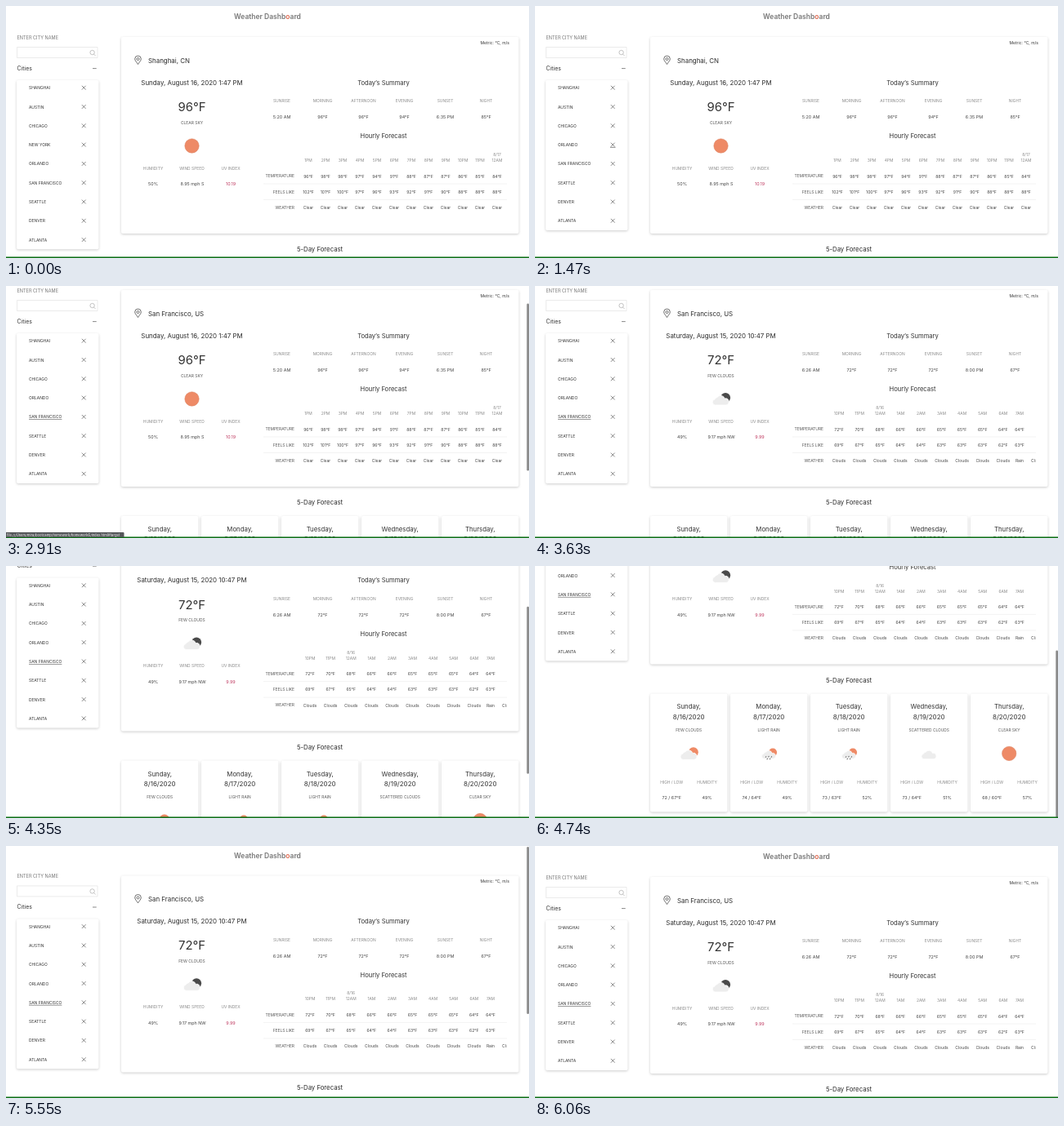
An HTML page for the animation above (6120 ms loop, 640 px wide and 309 px high).

```html
<!DOCTYPE html>
<html lang="en">
<head>
<meta charset="utf-8">
<title>Weather Dashboard</title>
<style>
  html, body { margin: 0; height: 100%; overflow: hidden; background: #fff; }
  svg { display: block; width: 100vw; height: 100vh; font-family: Inter, Roboto, sans-serif; fill: #444; }
  .panel { fill: #fff; filter: drop-shadow(0 1.3px 1.4px rgba(0, 0, 0, .2)); }
  .line { fill: none; stroke: #555; stroke-width: .7; }
</style>
</head>
<body>
<svg id="stage" viewBox="0 0 640 309"></svg>
<script>
const LOOP = 6120;
const GREY = '#8a8a8a', INK = '#2b2b2b', CORAL = '#ee8a66', PINK = '#bf3a60';
const ROW = 23.3;

// Text centred vertically on y; anchor is start, middle or end.
const text = (x, y, size, str, fill = '#444', anchor = 'middle', extra = '') =>
  `<text x="${x}" y="${y + size * .36}" font-size="${size}" fill="${fill}" text-anchor="${anchor}" ${extra}>${str}</text>`;
const label = (x, y, str, anchor) => text(x, y, 4.9, str, GREY, anchor);
const value = (x, y, str, fill) => text(x, y, 5.4, str, fill);
const path = (d, extra = '') => `<path class="line" d="${d}" ${extra}/>`;
const panel = (x, y, w, h) => `<rect class="panel" x="${x}" y="${y}" width="${w}" height="${h}" rx="2"/>`;
const group = (id, body) => `<g id="${id}">${body}</g>`;
const each = (list, fn) => list.map(fn).join('');

const sun = `<circle r="8.7" fill="${CORAL}" stroke="#d98263" stroke-width=".5"/>`;
const cloud = '<path d="M-7 7.5a3.6 3.6 0 0 1-.5-7.1 3.4 3.4 0 0 1 3-2.4 5.2 5.2 0 0 1 9.2 1.5 4 4 0 0 1 1.8 8z" ' +
  'fill="#ededed" stroke="#fff" stroke-width=".8"/>';
const behind = color => `<circle cx="5.6" cy="-1.6" r="6" fill="${color}"/>${cloud}`;
const drops = path('M-4 4l-.6 1.6M0 3.5l-.6 1.6M4 4l-.6 1.6M-2 7l-.6 1.6M2 7l-.6 1.6',
  'style="stroke:#444;stroke-width:1.1"');
const icons = {
  'CLEAR SKY': sun,
  'FEW CLOUDS': behind(CORAL),
  'LIGHT RAIN': `<g transform="scale(.85)">${behind(CORAL)}${drops}</g>`,
  'SCATTERED CLOUDS': `<g transform="scale(.9)">${cloud}</g>`,
  NIGHT: behind('#4a4a4a')
};
const icon = (x, y, name) => `<g transform="translate(${x} ${y})">${icons[name]}</g>`;

function cityList(id, cities) {
  return group(id, panel(13, 91, 100.5, cities.length * ROW - 2.5) + each(cities, (city, i) => {
    const y = 100.5 + i * ROW;
    return text(28, y, 4.95, city, '#333', 'start', city === 'SAN FRANCISCO' ? 'class="hovered"' : '') +
      path(`M92.8 ${y - 2.7}l4.8 4.8m0 -4.8l-4.8 4.8`);
  }));
}

function report(id, r) {
  const now = text(227.5, 94, 7.9, r.date, INK) +
    text(227.5, 123.7, 14.9, r.temp, '#333') +
    text(227.5, 143, 4.95, r.sky, '#555') + icon(227.5, 171.5, r.icon) +
    value(180, 218.5, r.humidity) + value(228, 218.5, r.wind) + value(275, 218.5, r.uv, PINK);
  const summary = each(r.summary, (v, i) => value(337.5 + i * 50, 136.2, v));
  const hourly = each(r.hours, (hour, i) => {
    const x = r.hourX(i);
    return label(x, 189.3, hour) +
      (hour === '12AM' ? label(x, 182.3, r.nextDay) : '') +
      text(x, 208.7, 5.1, r.temps[i] + '°F') +
      text(x, 228, 5.1, r.feels[i] + '°F') +
      text(x, 247.2, 5, r.weather[i]);
  });
  return group(id, now + summary + hourly);
}

const shanghai = {
  date: 'Sunday, August 16, 2020 1:47 PM', temp: '96°F', sky: 'CLEAR SKY', icon: 'CLEAR SKY',
  humidity: '50%', wind: '8.95 mph S', uv: '10.19',
  summary: ['5:20 AM', '96°F', '96°F', '94°F', '6:35 PM', '85°F'],
  hours: [...Array(11).keys()].map(i => i + 1 + 'PM').concat('12AM'), nextDay: '8/17',
  temps: [96, 98, 98, 97, 94, 91, 88, 87, 87, 86, 85, 84],
  feels: [102, 101, 100, 97, 96, 93, 92, 91, 90, 88, 88, 88],
  weather: Array(12).fill('Clear'),
  hourX: i => 370 + i * 21
};
const sanFrancisco = {
  date: 'Saturday, August 15, 2020 10:47 PM', temp: '72°F', sky: 'FEW CLOUDS', icon: 'NIGHT',
  humidity: '49%', wind: '9.17 mph NW', uv: '9.99',
  summary: ['6:26 AM', '72°F', '72°F', '72°F', '8:00 PM', '67°F'],
  hours: ['10PM', '11PM', '12AM', '1AM', '2AM', '3AM', '4AM', '5AM', '6AM', '7AM'], nextDay: '8/16',
  temps: [72, 70, 68, 66, 66, 65, 65, 65, 64, 64],
  feels: [69, 67, 65, 64, 64, 63, 63, 63, 62, 63],
  weather: [...Array(9).fill('Clouds'), 'Rain'],
  hourX: i => i < 9 ? 372 + i * 25.1 : 593
};
const days = [
  ['Sunday', 'FEW CLOUDS', '72 / 67°F', '49%'],
  ['Monday', 'LIGHT RAIN', '74 / 64°F', '49%'],
  ['Tuesday', 'LIGHT RAIN', '73 / 63°F', '52%'],
  ['Wednesday', 'SCATTERED CLOUDS', '73 / 64°F', '51%'],
  ['Thursday', 'CLEAR SKY', '68 / 60°F', '57%']
];
const cities = ['SHANGHAI', 'AUSTIN', 'CHICAGO', 'NEW YORK', 'ORLANDO', 'SAN FRANCISCO', 'SEATTLE', 'DENVER', 'ATLANTA'];

const sidebar = text(13.5, 39, 5.55, 'ENTER CITY NAME', '#777', 'start') +
  path('M13.5 50.5h98.5v13h-98.5z', 'style="stroke:#e2e2e2"') +
  path('M107.6 59.1l2 2M108.3 57a2.7 2.7 0 1 1-5.4 0a2.7 2.7 0 1 1 5.4 0', 'style="stroke:#aaa"') +
  text(13.5, 76.3, 6.9, 'Cities', '#333', 'start') + path('M106 76.6h4.7') +
  cityList('fullList', cities) + cityList('shortList', cities.filter(c => c !== 'NEW YORK')) +
  path('M92 173.3h6.5', 'id="closeLine"');

const today = panel(141, 38, 486.5, 241) +
  text(616, 45.2, 5, 'Metric: °C, m/s', '#333', 'end') +
  path('M161.5 71.5c-1.2-2.2-3.8-4.4-3.8-6.6a3.8 3.8 0 0 1 7.6 0c0 2.2-2.6 4.4-3.8 6.6zM163 65a1.5 1.5 0 1 1-3 0a1.5 1.5 0 1 1 3 0',
    'style="stroke:#333"') +
  text(174, 67.2, 7.9, '', INK, 'start', 'id="city"') +
  text(462, 94, 7.6, 'Today’s Summary', '#333') + text(462, 159.5, 7.6, 'Hourly Forecast', '#333') +
  each(['HUMIDITY', 'WIND SPEED', 'UV INDEX'], (s, i) => label(180 + i * 47.5, 199, s)) +
  each(['SUNRISE', 'MORNING', 'AFTERNOON', 'EVENING', 'SUNSET', 'NIGHT'], (s, i) => label(337.5 + i * 50, 116.5, s)) +
  each(['TEMPERATURE', 'FEELS LIKE', 'WEATHER'], (s, i) => text(353, 208.7 + i * 19.2, 4.9, s, '#555', 'end')) +
  path('M315 218h298M315 237.5h298', 'style="stroke:#eee"') +
  report('before', shanghai) +
  group('after', report('night', sanFrancisco) +
    `<g clip-path="url(#tableEdge)">${text(607, 247.2, 5, 'Clouds', '#444', 'start')}</g>`);

const forecast = text(384, 298.3, 7.75, '5-Day Forecast', INK) + each(days, ([day, sky, range, humidity], i) => {
  const x = 188.2 + i * 98;
  return panel(x - 47.2, 315, 94.5, 145) +
    text(x, 331.2, 7.8, day + ',', '#333') + text(x, 343.2, 8, `8/${16 + i}/2020`, '#333') +
    text(x, 360, 4.85, sky, '#555') + icon(x, 388.5, sky) +
    label(x - 21, 423.3, 'HIGH / LOW') + label(x + 22.3, 423.3, 'HUMIDITY') +
    value(x - 21, 442.3, range) + value(x + 22.3, 442.3, humidity);
});

const stage = document.getElementById('stage');
stage.innerHTML = '<clipPath id="tableEdge"><path d="M300 170h312.5v90H300z"/></clipPath>' +
  group('page',
    text(320, 13.2, 8.5, `Weather Dashb<tspan fill="#dd6b52">o</tspan>ard`, '#777', 'middle', 'font-weight="600"') +
    sidebar + today + forecast) +
  '<rect id="thumb" x="637.3" width="2.7" height="205" rx="1.3" fill="#8a8a8a"/>' +
  '<rect y="307.5" width="640" height="1.5" fill="#0b6e14"/>' +
  group('status', '<path d="M0 302h143.5a1 1 0 0 1 1 1v5H0z" fill="#55575a"/>' +
    text(1, 305, 4.2, 'file:///Users/mira/bootcamp/homework/homework6/index.html#target', '#eee', 'start'));

const $ = id => document.getElementById(id);
const show = (id, opacity) => $(id).setAttribute('opacity', +opacity);
const ramp = (t, from, to) => Math.min(1, Math.max(0, (t - from) / (to - from)));
const hovered = document.querySelectorAll('.hovered');

// The link jumps to its anchor, then the page is scrolled down and back up.
function scrollAt(t) {
  if (t < 2760) return 0;
  const down = Math.sin(ramp(t, 4230, 4770) * Math.PI / 2);
  const up = (1 - Math.cos(ramp(t, 4980, 5590) * Math.PI)) / 2;
  return 33 + 126 * down - 159 * up;
}

function thumbOpacity(t) {
  if (t < 2760) return 0;
  return t < 4230 ? 1 - ramp(t, 3480, 3630) : 1 - ramp(t, 5880, 6030);
}

function draw(t) {
  const scroll = scrollAt(t);
  $('page').setAttribute('transform', `translate(0 ${-scroll})`);
  $('thumb').setAttribute('y', scroll * .652);
  $('city').textContent = t < 2760 ? 'Shanghai, CN' : 'San Francisco, US';
  show('thumb', thumbOpacity(t));
  show('fullList', t < 810);
  show('shortList', t >= 810);
  show('closeLine', t >= 60 && t < 1500);
  show('before', t < 3480);
  show('after', t >= 3480);
  show('status', ramp(t, 1980, 2130) - ramp(t, 3030, 3180));
  hovered.forEach(el => el.setAttribute('text-decoration', t >= 1830 ? 'underline' : 'none'));
}

function tick() {
  draw(performance.now() % LOOP);
  requestAnimationFrame(tick);
}
tick();
</script>
</body>
</html>
```
